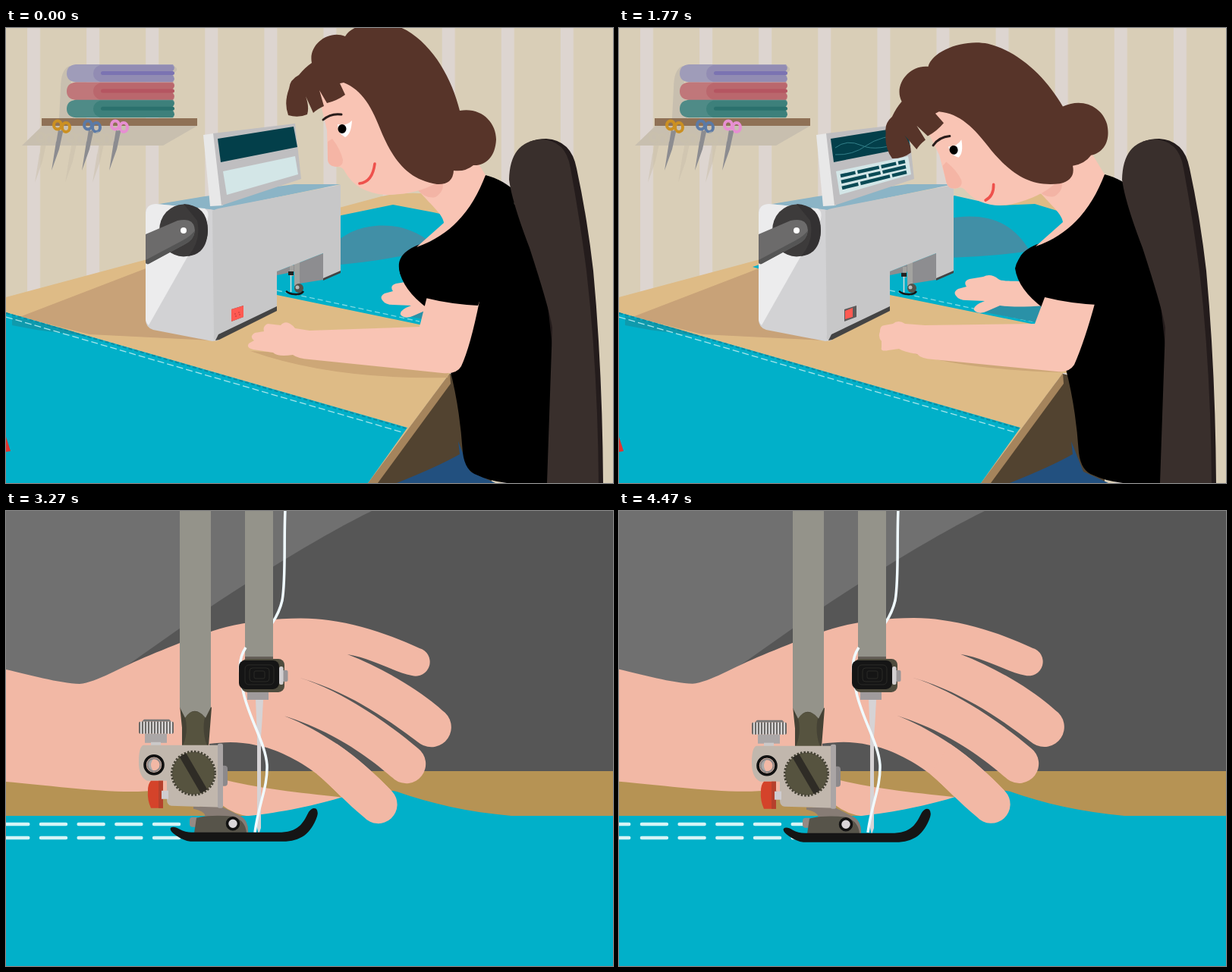
Animation of 800 by 600 pixels, one loop 4500 ms. Source, as an HTML page:

```html
<!DOCTYPE html>
<html lang="en">
<head>
<meta charset="utf-8">
<title>Sewing</title>
<style>
html, body { margin: 0; width: 100%; height: 100%; overflow: hidden; background: #d9ceb7; }
svg { display: block; width: 800px; height: 600px; }
</style>
</head>
<body>
<svg viewBox="0 0 800 600" xmlns="http://www.w3.org/2000/svg">
<defs>
  <pattern id="stripes" width="78.1" height="600" patternUnits="userSpaceOnUse" x="28"><rect width="17" height="600" fill="#ddd5d0"/></pattern>
  <pattern id="ribs" width="4" height="20" patternUnits="userSpaceOnUse" x="175"><rect width="4" height="20" fill="#d8d6d6"/><rect width="2" height="20" fill="#6b6967"/></pattern>
</defs>

<g id="room">
  <rect width="800" height="600" fill="#d9ceb7"/>
  <rect width="800" height="600" fill="url(#stripes)"/>
  <path d="M48 129L21 155H207L252 129Z" fill="#c8bfaf"/>
  <path d="M84 50Q72 54 72 80L70 119H90ZM221 50Q226 52 225 56L221 60Z" fill="#c8bfaf"/>
  <rect x="47" y="119" width="205" height="10" fill="#8f7156"/>
  <g id="towels"></g>
  <g id="scissors"></g>

  <path d="M0 355L495 222Q540 212 600 225V455H585L477 600H0Z" fill="#debb86"/>
  <path d="M18 381L200 311L270 412L110 404Z" fill="#c8a278"/>
  <path d="M585 456L640 470V600H486Z" fill="#524330"/>
  <path d="M585 455L477 600H490L586 469Z" fill="#a5845c"/>
  <path d="M0 375L529 527L477 600H0Z" fill="#01b0c9"/>
  <path d="M8 380L75 396L110 407L40 398L8 392Z" fill="#2a6f78" opacity=".35"/>
  <path d="M0 376L527 528" stroke="#0b8ca3" stroke-width="2" stroke-dasharray="5 3"/>
  <path d="M0 381L522 533" stroke="#a6e4ea" stroke-width="1.3" stroke-dasharray="9 4"/>
  <path d="M0 539L6 558L0 559Z" fill="#e3342f"/>

  <path id="tip" d="M176 315L200 307V322Z" fill="#01b0c9"/>
  <path id="backCloth" fill="#01b0c9"/>
  <path id="dome" fill="#418fa6"/>
  <path d="M357 346L545 387" stroke="#7fd8e2" stroke-width="1.3" stroke-dasharray="7 4"/>

  <path d="M357 321L418 297V332L387 337V320L357 326Z" fill="#8d8d90"/>
  <rect x="380" y="308" width="7" height="32" fill="#a3a3a0"/>
  <g id="smallNeedle">
    <rect x="374" y="313" width="5" height="14" fill="#a3a3a0"/>
    <rect x="372" y="321" width="7" height="5" fill="#222"/>
    <path d="M375.5 326V348" stroke="#ddd" stroke-width="1.5"/>
  </g>
  <circle cx="386" cy="343" r="6" fill="#55524a"/><circle cx="384" cy="342" r="2.5" fill="#bbb"/>
  <path d="M369 347Q374 351 380 351Q389 352 392 347" fill="none" stroke="#161616" stroke-width="2.5"/>

  <path d="M196 233L262 222L380 206H441L275 240Z" fill="#8bb4c6"/>
  <path d="M184 246Q184 232 198 232L268 239Q280 240 280 252V412L272 413L194 398Q184 395 184 384Z" fill="#d2d2d4"/>
  <path d="M184 246Q184 232 198 232L262 238Q270 243 264 258L188 392Q184 388 184 384Z" fill="#ececed"/>
  <path d="M272 241Q278 238 285 237L441 207V322L418 331V297L357 321V370L280 411Q272 413 274 405Z" fill="#c7c7c8"/>
  <path d="M276 412L280 404L357 367V373L281 411ZM418 330L441 320V323L418 333Z" fill="#444"/>
  <path d="M297 371L313 366V381L297 387Z" fill="#5d5a5a"/>
  <path id="button" fill="#ff5a52"/>
  <path id="dots" d="M301 377h2m3-2h2m-6 5h2m3-2h2" stroke="#b83a38"/>
  <ellipse cx="234" cy="267" rx="32" ry="34.5" fill="#3d3b3b"/>
  <path d="M234 232Q266 234 266 267Q265 298 240 301Q258 280 252 254Z" fill="#333132"/>
  <path d="M184 272L226 254Q248 249 249 267Q248 279 236 285L188 311Q184 312 184 308Z" fill="#6c6b6b"/>
  <path d="M184 306L233 280Q244 274 249 267Q248 279 236 285L188 311Q184 312 184 308Z" fill="#555"/>
  <circle cx="234" cy="267" r="4" fill="#fff"/>
  <path d="M260 141L274 139L286 234L269 235Z" fill="#e8e8e8"/>
  <path d="M273 139L381 126L389 199L284 234Z" fill="#bfbec0"/>
  <path d="M279 146L379 130L384 157L283 177Z" fill="#033f4a"/>
  <path d="M286 189L381 169L385 193L291 220Z" fill="#d3e6e7"/>
  <g id="readout" fill="none">
    <path d="M285 167Q308 168 326 155T380 140M285 158Q300 146 320 155T380 148" stroke="#327f89"/>
    <g stroke="#0a4a55" stroke-width="4.5">
      <path d="M292 195L377 176" stroke-dasharray="20 3 29 3"/>
      <path d="M293 203L378 183" stroke-dasharray="34 3 16 3"/>
      <path d="M294 211L379 190" stroke-dasharray="22 3 40 3"/>
    </g>
  </g>

  <g id="backHand">
    <path d="M478 366L502 364H560V390L472 373Z" fill="#2a91a7"/>
    <path d="M560 335C520 333 505 335 500 331Q490 323 480 328L462 331Q453 334 458 341L447 344Q440 348 444 353Q448 359 458 359L482 360Q466 366 468 372Q474 379 486 373L502 366C515 368 535 368 560 366Z" fill="#f9c4b4"/>
  </g>
  <path d="M515 600Q570 578 598 562L596 545L612 585L645 600Z" fill="#22507f"/>
  <path id="armShade" fill="#cda777"/>
  <path id="torso" d="M640 215C690 225 710 300 722 400V600H660Q636 597 622 590Q605 585 602 560Q598 500 585 450L556 370Q522 345 518 317Q524 290 556 290L590 280Z"/>
  <path id="arm" fill="#f9c4b4"/>
  <g id="sleeve">
    <path d="M518 317C516 300 530 288 560 281L632 194C648 198 662 206 674 218L650 290L622 366Q585 364 553 356Q520 340 518 317Z"/>
    <path d="M541 210C553 228 576 244 577 257L541 289C590 272 616 236 632 194L605 150L560 170Z" fill="#f9c4b4"/>
    <path d="M541 212Q553 226 566 223Q580 214 574 200Z" fill="#f3b4a5"/>
  </g>
  <g id="head">
    <path d="M410 80L423 135L424 172Q424 183 437 183Q444 183 447 190Q462 217 500 220Q540 220 566 205L580 180L500 60L430 65Z" fill="#f9c4b4"/>
    <path d="M424 150V172Q424 183 437 183Q444 182 444 174Q441 160 430 146Z" fill="#f5b5a5"/>
    <path d="M418 121Q428 112 442 114" fill="none" stroke="#291d1b" stroke-width="3" stroke-linecap="round"/>
    <path d="M437 127Q448 130 456 122Q455 140 447 144Q438 140 437 127Z" fill="#fff"/>
    <ellipse cx="443" cy="133" rx="5.5" ry="6"/>
    <path id="mouth" fill="none" stroke="#ee514c" stroke-width="3.6" stroke-linecap="round"/>
    <path id="hair" d="M440 73L447 88Q436 96 423 99L413 82L419 103Q410 107 405 112L395 90Q400 104 397 114Q385 119 372 115Q366 99 373 80Q374 68 386 62Q394 52 403 46C398 22 425 2 447 11C458 -8 500 -12 528 3C564 24 588 68 598 109C626 104 646 124 646 147C645 170 632 182 616 181Q605 190 590 188Q589 207 568 206C530 200 512 176 496 140C482 104 470 82 445 72Z" fill="#573429"/>
  </g>
  <path d="M690 150Q700 146 712 146Q745 148 752 185Q766 250 774 320Q786 450 787 600H740Z" fill="#241c1c"/>
  <path d="M663 200Q664 150 704 147Q738 147 744 185Q756 250 765 320Q780 450 781 600H713L720 395Q716 370 690 290Q667 230 663 200Z" fill="#392f2c"/>
</g>

<g id="closeup">
  <rect width="800" height="600" fill="#565656"/>
  <path d="M0 0H482C420 30 340 80 270 126L0 316Z" fill="#707070"/>
  <rect y="343" width="800" height="60" fill="#b69354"/>
  <path id="palm" fill="#f2b8a5" d="M-700 209H0C30 216 70 227 97 228C120 226 150 206 190 190C220 178 262 160 290 153C330 143 390 138 425 144C470 150 510 165 545 181A18.5 18.5 0 0 1 535 217C510 212 485 195 450 189C500 208 550 240 575 263A25.5 25.5 0 0 1 546 307C510 280 450 235 376 217C432 230 502 278 543 313A25.5 25.5 0 0 1 512 354C480 326 405 264 283 254C345 254 395 280 436 307C464 326 488 348 509 370A25 25 0 0 1 472 404C450 386 430 364 410 347C385 328 355 313 330 309C305 303 285 305 268 307V348L290 355C340 367 400 373 447 378C400 394 360 402 322 403Q300 400 285 388L200 368C150 375 60 362 0 357H-700Z"/>
  <path id="cloth" fill="#01b0c9"/>
  <g id="stitches" stroke="#d6f4f6" stroke-width="4.5" stroke-linecap="round" stroke-dasharray="33 16.7">
    <path d="M-60 413H246"/><path d="M-60 431H240"/>
  </g>
  <path id="finger" d="M436 307C464 326 488 348 509 370A25 25 0 0 1 472 404C450 386 430 364 410 347Z" fill="#f2b8a5"/>
  <path id="topThread" fill="none" stroke="#f0faff" stroke-width="3.5"/>
  <g id="needle">
    <rect x="315" y="-60" width="37" height="197" fill="#94938a"/>
    <rect x="315" y="136" width="37" height="4" fill="#655f58"/>
    <path d="M329 192H339Q338 218 336 242V362L333 371L331 362V242Z" fill="#d6d3d5"/>
    <rect x="318" y="182" width="28" height="11" fill="#a09b9c"/>
  </g>
  <path id="thread" fill="none" stroke="#f0faff" stroke-width="3.5"/>
  <g id="clamp">
    <rect x="310" y="139" width="57" height="44" rx="8" fill="#4f4c3e"/>
    <rect x="307" y="141" width="53" height="38" rx="8" fill="#151515"/>
    <g fill="none" stroke="#2a2a27"><rect x="315" y="147" width="38" height="26" rx="5"/><rect x="321" y="151" width="26" height="18" rx="4"/><rect x="327" y="155" width="14" height="10" rx="2"/></g>
    <rect x="364" y="154" width="7.5" height="15" rx="2" fill="#9a9698"/>
    <rect x="360" y="149" width="5.5" height="24" rx="2.5" fill="#d2cfd1"/>
  </g>
  <g id="foot">
    <path d="M229 256L271 258L267 309H232V285Z" fill="#454235"/>
    <path d="M236 271Q248 256 262 271Q258 290 265 309H233Q241 290 236 271Z" fill="#56533f"/>
    <path d="M229 -9H270V258L263 272Q248 254 236 272L229 258Z" fill="#94938a"/>
    <path d="M179 277L182 274H215L218 277Z" fill="#777"/>
    <rect x="175" y="277" width="46" height="16" rx="2" fill="url(#ribs)"/>
    <rect x="183" y="293" width="29" height="12" fill="#aba7a7"/>
    <rect x="191" y="304" width="13" height="5" fill="#cbc9c9"/>
    <rect x="282" y="335" width="10" height="27" rx="4" fill="#8c898b"/>
    <path d="M247 389H284L310 402Q320 408 319 424H300L262 402Q264 396 247 392Z" fill="#877c75"/>
    <path fill-rule="evenodd" d="M181 308H284V390L218 388Q212 387 212 380V355H186Q175 350 175 330Q175 310 181 308ZM185 334a10 10 0 1 0 20 0a10 10 0 1 0 -20 0Z" fill="#c1b7ad"/>
    <path d="M195 325A9 9 0 0 0 195 343Q187 334 195 325Z" fill="#aaa"/>
    <circle cx="195" cy="334" r="8.5" fill="none" stroke="#8b8787" stroke-width="2"/>
    <circle cx="195" cy="334" r="12" fill="none" stroke="#111" stroke-width="3.6"/>
    <rect x="279" y="306" width="7" height="85" rx="2" fill="#aaa5a5"/>
    <circle cx="247" cy="345" r="28" fill="#56533f"/>
    <circle cx="247" cy="345" r="28.5" fill="none" stroke="#454235" stroke-width="3" stroke-dasharray="2.5 2"/>
    <path d="M233 321L261 369" stroke="#2f2c26" stroke-width="10"/>
    <path d="M191 355H207V391H191Q186 380 187 368Q187 359 191 355Z" fill="#d4432a"/>
    <path d="M201 355H207V391H201Z" fill="#b5402c"/>
    <rect x="205" y="368" width="9" height="11" fill="#cfccd0"/>
    <rect x="242" y="403" width="12" height="13" rx="4" fill="#958a85"/>
    <path d="M251 404Q270 399 300 402Q316 408 317 424H248Z" fill="#57544a"/>
    <circle cx="299" cy="411.5" r="7.5" fill="#dad6d9" stroke="#111" stroke-width="3.5"/>
    <path d="M217 417Q221 414 229 419Q236 423 245 423H355C385 424 391 412 399 396Q404 389 409 392Q412 396 410 402C402 425 388 435 365 435H243Q234 434 224 427Q215 421 217 417Z" fill="#151515"/>
  </g>
</g>
</svg>
<script>
const LOOP = 4500, CUT = 2235;
const $ = id => document.getElementById(id);
const set = (id, name, value) => $(id).setAttribute(name, value);
const move = (id, x, y) => set(id, 'transform', `translate(${x} ${y})`);
const clamp = v => Math.min(1, Math.max(0, v));
const ease = (t, a, b) => (1 - Math.cos(Math.PI * clamp((t - a) / (b - a)))) / 2;
const lerp = (a, b, k) => a + (b - a) * k;

// Blend two paths that share the same commands.
function blend(a, b, k) {
  const nums = b.match(/-?[\d.]+/g);
  let i = 0;
  return a.replace(/-?[\d.]+/g, n => lerp(+n, +nums[i++], k).toFixed(2));
}

// Three poses of each soft part in the room.
const shapes = {
  backCloth: [
    'M300 310L442 247L510 233L563 243L640 260L600 394L545 391L357 352L345 349Z',
    'M300 310L442 249L490 236L548 235L640 260L600 394L545 391L357 352L345 349Z',
    'M300 290L442 221L500 234L548 232L640 260L600 394L548 391L357 352L345 349Z'
  ],
  dome: [
    'M430 287C455 262 485 259 508 261C536 264 556 278 568 291C530 300 480 309 430 313Z',
    'M430 280C455 258 480 257 502 260C526 263 544 276 554 289C520 300 480 307 430 312Z',
    'M430 252C450 248 468 247 486 251C512 257 530 274 541 294C510 299 470 302 430 303Z'
  ],
  armShade: [
    'M322 426Q430 464 582 461L585 440Z',
    'M385 428Q450 450 582 454L585 440Z',
    'M385 428Q450 450 582 454L587 440Z'
  ],
  arm: [
    'M556 350L624 360Q612 420 600 446Q594 457 575 455L400 437Q385 436 378 431Q358 434 352 428L326 424Q316 422 320 416L327 412Q320 407 328 402L340 400Q338 393 345 390L362 392Q370 383 381 396L400 399L545 394Z',
    'M556 350L622 360Q608 412 592 444Q586 455 570 453L410 437Q395 436 390 430Q372 428 366 424L352 427Q343 427 344 420L345 412Q339 408 341 400L340 396Q338 391 346 392L358 392Q364 384 373 391L400 393L545 390Z',
    'M563 350L628 360Q614 412 600 444Q593 455 577 453L414 437Q398 436 393 430Q375 427 369 423L355 425Q344 427 346 421L346 413Q341 408 344 400L344 398Q345 392 350 392L361 390Q368 384 377 390L403 392L548 390Z'
  ],
  mouth: [
    'M466 205Q483 203 486 179',
    'M467 205Q482 202 485 187',
    'M469 207Q481 204 484 189'
  ]
};

const threads = {
  topThread: [
    'M374 -2C382 40 385 90 372 115C365 128 358 129 350 131',
    'M368 -2C366 40 369 90 364 118C360 135 354 143 350 149'
  ],
  thread: [
    'M315 138C302 145 302 165 310 180C322 215 345 260 346 290C346 325 330 370 318 420',
    'M316 180C306 195 307 210 312 235C318 270 342 305 344 335C345 365 333 385 328 424'
  ]
};

function furnish() {
  const cloths = [['#9f9cb9', '#928cb3', '#7b73b2'], ['#c0777a', '#ba676d', '#b55561'], ['#4f8b87', '#3d807b', '#2b716d']];
  $('towels').innerHTML = cloths.map(([a, b, c], i) => `<g transform="translate(0 ${i * 23.4})">
    <path d="M92 48H220Q224 52 220 57V62Q224 67 220 71.500H92Q80 70 80 60Q80 49 92 48Z" fill="${a}"/>
    <path d="M124 49H219Q224 53 219 57V62Q224 67 219 71H124Q115 68 115 60Q115 52 124 49Z" fill="${b}"/>
    <rect x="125" y="57" width="97" height="5" rx="2.5" fill="${c}"/></g>`).join('');

  const pair = (rings, blade) => `<path d="M69 134L74 138L60 188ZM75 137L70 160L60 188L66 150Z" fill="${blade}"/>
    <g fill="none" stroke="${rings}" stroke-width="4"><ellipse cx="68" cy="128" rx="5" ry="5.500"/><ellipse cx="79" cy="131" rx="5" ry="6"/></g>
    <circle cx="73" cy="137" r="2" fill="${blade}"/>`;
  const at = (x, y, s) => `<g transform="translate(${x} ${y})">${s}</g>`;
  $('scissors').innerHTML = [['#cb9022', 0], ['#5b7aa6', 40], ['#e78fd2', 76]].map(([c, x]) =>
    `<g opacity=".55">${at(x - 22, 16, pair('#cbc1ad', '#cbc1ad'))}</g>` + at(x, 0, pair(c, '#8c8c90'))).join('');
}

function drawRoom(t) {
  const a = ease(t, 0, 870), b = ease(t, 870, 1770);
  const mix = (p, q, r) => lerp(lerp(p, q, a), r, b);
  for (const id in shapes) {
    const [p, q, r] = shapes[id];
    set(id, 'd', b > 0 ? blend(q, r, b) : blend(p, q, a));
  }
  set('head', 'transform', `translate(${mix(0, 4, 11)} ${mix(0, 0, -3)}) rotate(${mix(0, -14, -13)} 572 205)`);
  // The hair swings a little further than the face, hinged at the bun.
  set('hair', 'transform', `translate(606 147) rotate(${-2.5 * a}) scale(${1 + 0.04 * a} 1) translate(-606 -147)`);
  move('torso', mix(0, 1, 4), 0);
  move('sleeve', mix(0, 2, 8), mix(0, 0, -1));
  move('backHand', mix(52, 42, 0), mix(6, 9, 0));
  move('tip', mix(26, 22, 0), 0);
  const on = t >= 300;
  $('readout').style.display = on ? '' : 'none';
  $('dots').style.display = on ? 'none' : '';
  set('button', 'd', on ? 'M298 373L308 369V381L298 384Z' : 'M297 371L313 366V381L297 387Z');
  move('smallNeedle', 0, on ? 2 - 2 * Math.cos(t * Math.PI / 60) : 0);
}

function drawCloseup(t) {
  const s = t - 2250;
  const down = (1 - Math.cos(s * Math.PI / 60)) / 2;
  move('needle', 0, 56 * down);
  move('clamp', 0, 56 * down);
  for (const id in threads) set(id, 'd', blend(...threads[id], down));
  move('foot', 0, clamp(s / 2220) * 1.7);

  const pitch = 49.7, x = 48 - 0.3447 * s;
  const off = ((x % pitch) + pitch) % pitch;
  set('stitches', 'stroke-dashoffset', -(off + 62));

  const sway = 2 * Math.cos((t - 3270) * 2 * Math.PI / 1320) - 2;
  const hx = -640 * (1 - ease(t, 2280, 2850));
  const hy = 36 * (1 - ease(t, 2640, 3200)) + sway;
  move('palm', hx, hy);
  move('finger', hx, hy);
  const p = ease(t, 2600, 3150);
  const y = v => (402 - v * p + sway * p * v / 60).toFixed(2);
  set('cloth', 'd', `M0 402H320C360 ${y(4)} 410 ${y(14)} 447 ${y(26)}C470 ${y(34)} 495 ${y(36)} 515 ${y(32)}C560 ${y(16)} 610 ${y(5)} 666 402H800V600H0Z`);
}

function draw(now) {
  const t = now % LOOP, room = t < CUT;
  $('room').style.display = room ? '' : 'none';
  $('closeup').style.display = room ? 'none' : '';
  if (room) drawRoom(t); else drawCloseup(t);
}

furnish();
const start = performance.now();
function tick() {
  draw(performance.now() - start);
  requestAnimationFrame(tick);
}
tick();
</script>
</body>
</html>
```
